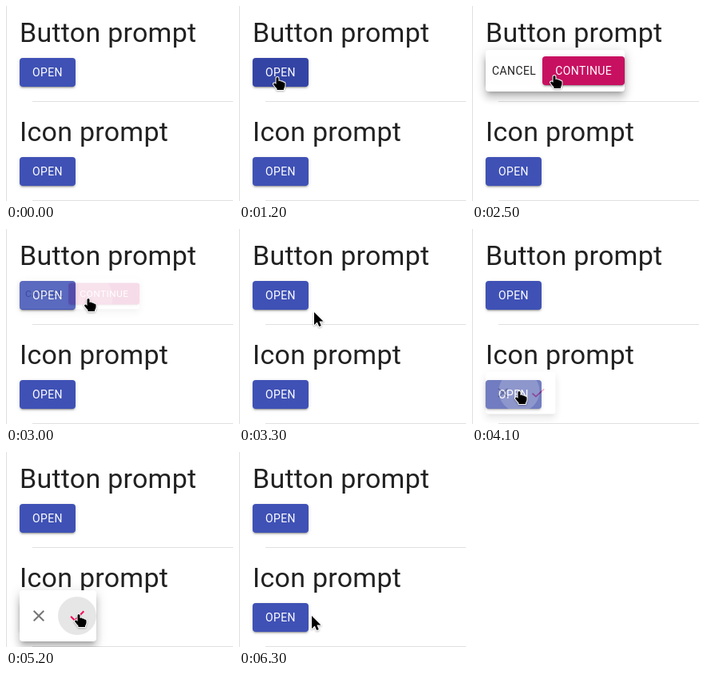
Animation of 284x244 px, one loop 6400 ms. Source, as an HTML page:

```html
<!DOCTYPE html>
<html lang="en">
<head>
<meta charset="utf-8">
<style>
html, body { margin: 0; width: 100%; height: 100%; overflow: hidden; background: #fff; }
body { position: relative; font-family: Roboto, sans-serif; color: rgba(0,0,0,.87); }
body::before { content: ""; position: absolute; left: 0; top: 0; width: 1px; height: 100%; background: #e0e0e0; }
section { position: absolute; left: 17px; width: 267px; height: 124px; }
h4 { position: absolute; margin: 0; top: 1px; font: 400 34px/42px Roboto, sans-serif; letter-spacing: .00735em; white-space: nowrap; }
hr { position: absolute; margin: 0; border: 0; left: 16px; right: 0; top: 108px; height: 1px; background: #e0e0e0; }
.btn { position: relative; overflow: hidden; box-sizing: border-box; height: 36px; padding: 6px 16px; border-radius: 4px;
  font-size: 14px; line-height: 24px; letter-spacing: .02857em; white-space: nowrap; }
.raised { color: #fff; background: #3f51b5;
  box-shadow: 0 3px 1px -2px rgba(0,0,0,.2), 0 2px 2px rgba(0,0,0,.14), 0 1px 5px rgba(0,0,0,.12); }
section > .btn { position: absolute; top: 54px; }
.popup { position: absolute; left: 0; display: flex; padding: 8px 0; border-radius: 4px; background: #fff; transform-origin: 0 50%;
  box-shadow: 0 5px 5px -3px rgba(0,0,0,.2), 0 8px 10px 1px rgba(0,0,0,.14), 0 3px 14px 2px rgba(0,0,0,.12); }
#textPopup { top: 44px; }
#iconPopup { top: 38px; }
#cancel { padding: 6px 8px; }
.icon { position: relative; overflow: hidden; box-sizing: border-box; width: 48px; height: 48px; padding: 12px; border-radius: 50%; color: rgba(0,0,0,.54); }
.icon svg { display: block; width: 24px; height: 24px; fill: currentColor; }
.ripple { position: absolute; border-radius: 50%; background: currentColor; }
#cursor { position: absolute; left: 0; top: 0; width: 1px; height: 1px; overflow: visible; stroke: #fff; stroke-linejoin: round; paint-order: stroke; stroke-width: 2;
  filter: drop-shadow(0 1px 1px rgba(0,0,0,.3)); }
</style>
</head>
<body>
<section style="top:11px">
  <h4>Button prompt</h4>
  <div class="btn raised" id="open1">OPEN</div>
  <hr>
  <div class="popup" id="textPopup">
    <div class="btn" id="cancel">CANCEL</div>
    <div class="btn raised" id="proceed">CONTINUE</div>
  </div>
</section>
<section style="top:135px">
  <h4>Icon prompt</h4>
  <div class="btn raised" id="open2">OPEN</div>
  <hr>
  <div class="popup" id="iconPopup">
    <div class="icon"><svg viewBox="0 0 24 24"><path d="M19 6.41L17.59 5 12 10.59 6.41 5 5 6.41 10.59 12 5 17.59 6.41 19 12 13.41 17.59 19 19 17.59 13.41 12z"/></svg></div>
    <div class="icon" id="check"><svg viewBox="0 0 24 24" style="color:#f50057"><path d="M9 16.17L4.83 12l-1.42 1.41L9 19 21 7l-1.41-1.41z"/></svg></div>
  </div>
</section>
<svg id="cursor">
  <path id="arrow" d="M0 0V16L3.8 12.5 6.2 18 8.8 17 6.4 11.5H11.5Z"/>
  <path id="hand" d="M-1.5 1.5Q-1.5 0 0 0T1.5 1.5V5Q4 4 4.5 5.5 7 5 7 6.5 9.5 6 9.5 8V11Q9 13 8 14.5V16H-.5V14.5Q-3 12-5 9-5 7-3 7.5L-1.5 9Z"/>
</svg>
<script>
const LOOP = 6400, STEP = 100;
const $ = id => document.getElementById(id);
const clamp = v => Math.min(1, Math.max(0, v));
const mix = (a, b, k) => a + (b - a) * k;
const between = (t, a, b) => t >= a && t < b;

// cubic-bezier(.4, 0, .2, 1)
function ease(x) {
  x = clamp(x);
  let lo = 0, hi = 1, s = .5;
  for (let i = 0; i < 20; i++) {
    s = (lo + hi) / 2;
    const bx = 1.2 * (1 - s) ** 2 * s + .6 * (1 - s) * s * s + s ** 3;
    if (bx < x) lo = s; else hi = s;
  }
  return 3 * (1 - s) * s * s + s ** 3;
}

const fade = (t, from, to, d = 250) => ease((t - from) / d) - ease((t - to) / d);
const blend = (a, b, k) => `rgb(${a.map((v, i) => Math.round(mix(v, b[i], k)))})`;
const BLUE = [63, 81, 181], DARK_BLUE = [48, 63, 159];
const PINK = [245, 0, 87], DARK_PINK = [197, 17, 98];

function grow(id, t, open, close, d) {
  const opacity = fade(t, open, close, d);
  const k = ease((t - open) / (d * .666)) - ease((t - close - d * .333) / (d * .666));
  const s = mix(.75, 1, k), style = $(id).style;
  style.opacity = opacity;
  style.visibility = between(t, open, close + d) ? "visible" : "hidden";
  style.transform = `scale(${s}, ${s * s})`;
}

function addRipple(id, x, y, r, start, end) {
  const dot = document.createElement("span");
  dot.className = "ripple";
  dot.style.cssText = `left:${x - r}px;top:${y - r}px;width:${2 * r}px;height:${2 * r}px`;
  $(id).append(dot);
  return t => {
    const k = ease((t - start) / 550);
    dot.style.transform = `scale(${k})`;
    dot.style.opacity = t < start ? 0 : mix(.1, .3, k) * (1 - ease((t - end) / 550));
  };
}

const ripples = [
  addRipple("open1", 31, 24, 48, 1400, 1500),
  addRipple("proceed", 15, 24, 92, 2800, 2880),
  addRipple("open2", 42, 14, 48, 3900, 4040),
  addRipple("check", 24, 24, 24, 5400, 5520),
];

// time, x, y of the pointer tip
const track = [
  [900, -14, 112], [1200, 48, 89], [2200, 50, 89], [2500, 103, 87], [3000, 103, 87], [3300, 94, 104],
  [3500, 103, 148], [3900, 59, 203], [4100, 59, 203], [4500, 91, 203], [5600, 91, 203], [5800, 91, 205], [LOOP, 91, 205],
];

function moveCursor(t) {
  const i = track.findIndex(p => p[0] > t);
  $("cursor").style.visibility = i > 0 ? "visible" : "hidden";
  if (i < 1) return;
  const [t0, x0, y0] = track[i - 1], [t1, x1, y1] = track[i];
  const k = (t - t0) / (t1 - t0), s = k * k * (3 - 2 * k);
  $("cursor").style.transform = `translate(${mix(x0, x1, s)}px, ${mix(y0, y1, s)}px)`;
  const pointing = between(t, 1100, 3100) || between(t, 3800, 5750);
  $("hand").style.display = pointing ? "" : "none";
  $("arrow").style.display = pointing ? "none" : "";
}

function draw(t) {
  $("open1").style.background = blend(BLUE, DARK_BLUE, fade(t, 1080, 1500));
  $("open2").style.background = blend(BLUE, DARK_BLUE, fade(t, 3780, 4040));
  $("proceed").style.background = blend(PINK, DARK_PINK, fade(t, 2330, 3000));
  $("cancel").style.background = `rgba(0,0,0,${.08 * fade(t, 1550, 2330)})`;
  $("check").style.background = `rgba(0,0,0,${.1 * fade(t, 4150, 5800, 150)})`;
  grow("textPopup", t, 1450, 2880, 207);
  grow("iconPopup", t, 4040, 5540, 216);
  ripples.forEach(r => r(t));
  moveCursor(t);
}

const began = performance.now();
function tick() {
  const t = (performance.now() - began) % LOOP;
  draw(Math.floor(t / STEP) * STEP);
  requestAnimationFrame(tick);
}
tick();
</script>
</body>
</html>
```
